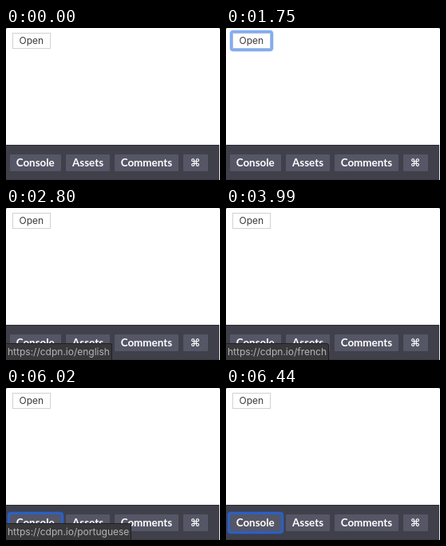
Write an HTML page with a canvas that moves like this. It is 268 by 190 pixels and loops after 8.19 s.

```html
<!DOCTYPE html>
<html lang="en">
<head>
<meta charset="utf-8">
<title>Link status bar</title>
<style>
html, body { margin: 0; width: 100%; height: 100%; overflow: hidden; background: #fff; }
canvas { display: block; width: 268px; height: 190px; }
</style>
</head>
<body>
<canvas id="stage"></canvas>
<script>
const W = 268, H = 190, LOOP = 8190, FOOTER = 146;
const canvas = document.getElementById('stage');
const ctx = canvas.getContext('2d');
const scale = window.devicePixelRatio || 1;
canvas.width = W * scale;
canvas.height = H * scale;
ctx.scale(scale, scale);

const UI = '12px Inter, sans-serif';
const LABEL = 'bold 13.4px Lato, sans-serif';
const SYMBOL = 'bold 13px "DejaVu Sans", sans-serif';

// Status text: start time, last path segment
const links = [
  [2730, 'english'], [3360, 'spanish'], [3990, 'french'],
  [4620, 'italian'], [5320, 'portuguese']
];
// Status opacity: start time, alpha
const fades = [[0, 0], [2730, 0.6], [2800, 1], [6300, 0.55], [6370, 0.25], [6440, 0]];

// x, width, label, text x, font
const buttons = [
  [5, 64, 'Console', 12.7, LABEL], [75, 55, 'Assets', 83, LABEL],
  [136, 80, 'Comments', 143.7, LABEL], [222, 31, '⌘', 231, SYMBOL]
];

function latest(list, t) {
  let value = list[0][1];
  for (const [start, v] of list) if (t >= start) value = v;
  return value;
}

function rect(x, y, w, h, color) {
  ctx.fillStyle = color;
  ctx.fillRect(x, y, w, h);
}

function roundRect(x, y, w, h, r, color) {
  ctx.beginPath();
  ctx.roundRect(x, y, w, h, r);
  ctx.fillStyle = color;
  ctx.fill();
}

function text(str, x, y, font, color) {
  ctx.font = font;
  ctx.fillStyle = color;
  ctx.fillText(str, x, y);
}

// Soft halo outside a solid band; the button is painted over the middle
function focusRing(x, y, w, h, color, halo) {
  for (const [grow, c] of [[4, halo], [3, color]]) {
    roundRect(x - grow, y - grow, w + 2 * grow, h + 2 * grow, grow + 1, c);
  }
}

function drawPage(focused) {
  rect(0, 0, W, FOOTER, '#fff');
  rect(0, 0, 1, 1, '#777');
  rect(W - 1, 0, 1, 1, '#777');
  if (focused) focusRing(8, 6, 48, 20, '#82acf0', '#dfeafc');
  rect(8, 6, 48, 20, focused ? '#a9bddf' : '#d2d2d2');
  rect(9, 7, 46, 18, '#fff');
  text('Open', 16.5, 20, UI, '#3a3a3a');
}

function drawFooter(focused) {
  rect(0, FOOTER, W, H - FOOTER, '#40404b');
  rect(0, FOOTER, W, 1, '#2c2c34');
  rect(0, H - 1, W, 1, '#383841');
  rect(W - 1, FOOTER, 1, H - FOOTER, '#e8e8ea');
  for (const [x, w, label, tx, font] of buttons) {
    if (focused && x === 5) focusRing(x, 158, w, 21, '#2a60c4', '#37486f');
    roundRect(x, 158, w, 21, 1, '#555666');
    text(label, tx, 173, font, '#fff');
  }
}

function drawStatus(t) {
  const alpha = latest(fades, t);
  if (!alpha) return;
  const url = 'https://cdpn.io/' + latest(links, t);
  ctx.font = UI;
  const right = Math.round(2 + ctx.measureText(url).width) + 3;
  ctx.globalAlpha = alpha;
  roundRect(-4, 169, right + 4, 25, 3, '#1f1f23');
  roundRect(-4, 170, right + 3, 24, 2, '#38383b');
  text(url, 2, 184, UI, '#b4b4b6');
  ctx.globalAlpha = 1;
}

const start = performance.now();

function frame() {
  const t = (performance.now() - start) % LOOP;
  drawPage(t >= 1750 && t < 2590);
  drawFooter(t >= 6020);
  drawStatus(t);
  requestAnimationFrame(frame);
}
frame();
</script>
</body>
</html>
```
